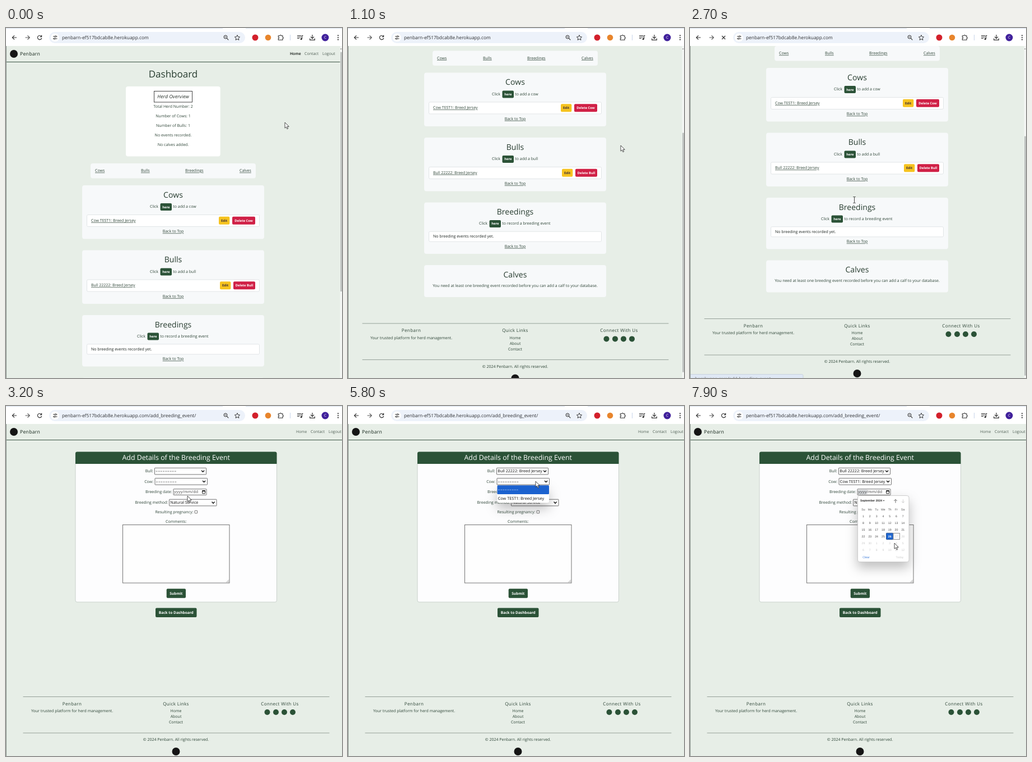
Animation, 600 px wide and 623 px high, one loop 8000 ms. Source, as an HTML page:

```html
<!DOCTYPE html>
<html lang="en">
<head>
<meta charset="utf-8">
<title>Herd dashboard</title>
<style>
html,body{margin:0;width:100%;height:100%;overflow:hidden;background:#e7eee7}
svg{display:block;width:600px;height:623px}
text{font-family:"Open Sans","Noto Sans",sans-serif;text-rendering:geometricPrecision;white-space:pre}
.arial{font-family:"Liberation Sans",Arial,sans-serif}
.u{text-decoration:underline;text-decoration-thickness:.6px}
.pop{filter:drop-shadow(0 10px 10px rgba(0,0,0,.25))}
</style>
</head>
<body>
<svg id="stage" viewBox="0 0 600 623" xmlns="http://www.w3.org/2000/svg"></svg>
<script>
const BRAND = 'Penbarn', HOST = 'penbarn-ef517bdcab8e.herokuapp.com';
const INK = '#2f4638', DARK = '#2b5237', LOOP = 8000;

// y is the visual middle of the line
const text = (x, y, s, size = 7, o = {}) =>
  `<text x="${x}" y="${(y + size * .35).toFixed(2)}" font-size="${size}" fill="${o.fill || INK}"` +
  ` text-anchor="${o.at || 'start'}" font-weight="${o.bold ? 700 : o.weight || 400}"` +
  ` letter-spacing="${o.ls || 0}" class="${o.cls || ''}"${o.italic ? ' font-style="italic"' : ''}${o.id ? ` id="${o.id}"` : ''}>${s}</text>`;
const mid = (x, y, s, size, o) => text(x, y, s, size, { ...o, at: 'middle' });
const link = (x, y, s, o) => text(x, y, s, 7, { ...o, cls: 'u' });
const rect = (x, y, w, h, fill, r = 0, more = '') =>
  `<rect x="${x}" y="${y}" width="${w}" height="${h}" rx="${r}" fill="${fill}" ${more}/>`;
const box = (x, y, w, h, stroke, r = 0, fill = '#fff') =>
  rect(x, y, w, h, fill, r, `stroke="${stroke}" stroke-width=".9"`);
const disc = (x, y, r, fill) => `<circle cx="${x}" cy="${y}" r="${r}" fill="${fill}"/>`;
const line = (d, stroke = '#333', w = 1.2, more = '') =>
  `<path d="${d}" fill="none" stroke="${stroke}" stroke-width="${w}" ${more}/>`;
const group = (id, s, more = '') => `<g id="${id}" ${more}>${s}</g>`;
const button = (x, y, w, h, s, fill, size = 5.8, color = '#fff') =>
  rect(x, y, w, h, fill, 2) + mid(x + w / 2, y + h / 2, s, size, { fill: color, bold: 1 });
const DASHES = '–'.repeat(9);

function toolbar() {
  const dot = y => disc(593, y, 1.1, '#333');
  return rect(0, 0, 600, 32, '#fff') +
    rect(0, 0, 387, 1.2, '#dce4f0') + rect(428, 0, 172, 1.2, '#dce4f0') +
    line('M19,17H11.5M15,13.3L11.3,17 15,20.7') +
    line('M34.5,17H42M38.5,13.3L42.2,17 38.5,20.7', '#555') +
    group('reload', line('M63,14.6A3.7,3.7 0 1 0 63.7,18') + line('M63.6,12.8V15.6H60.6')) +
    group('stop', line('M57,14L63,20M63,14L57,20')) +
    rect(77, 7, 350, 20, '#edf2fa', 10) + disc(87.5, 17, 7.3, '#fff') +
    line('M84,15H87M90,15H91.5M83.8,19H85.2M88.2,19H91.5', '#333', 1) +
    `<g fill="none" stroke="#333">${['88.6" cy="15', '86.7" cy="19'].map(c => `<circle cx="${c}" r="1.3"/>`).join('')}</g>` +
    text(100, 17, '', 8.35, { id: 'url', fill: '#2c2e31' }) +
    `<circle cx="392" cy="16" r="3" fill="none" stroke="#333"/>` + line('M394.2,18.2L397.3,21.3M390.6,16H393.4') +
    line('M413,12.6L414.4,15.6 417.6,16 415.2,18.2 415.9,21.4 413,19.7 410.1,21.4 410.8,18.2 408.4,16 411.6,15.6Z', '#333', 1) +
    disc(445, 17, 5.5, '#d3202b') + disc(468, 17, 5.3, '#e8852c') +
    line('M486.3,13.8H489A1.2,1.2 0 0 1 491.6,13.8H494V16.2A1.3,1.3 0 0 1 494,18.8V21.3H486.3V18.8A1.3,1.3 0 0 0 486.3,16.2Z', '#333', 1.1) +
    line('M507.5,12V22', '#c9d5ea', 1) +
    line('M520,13.5H527M520,16H527M520,18.5H524M528.5,19.5V13.5H530.5') + disc(527.2, 19.6, 1.6, '#333') +
    line('M547,12V18.5M544,15.7L547,18.7 550,15.7M542.7,18.5V21.3H551.3V18.5') +
    disc(570, 17, 6.5, '#40209b') + mid(570, 17, 'C', 6.5, { fill: '#fff' }) +
    dot(13.3) + dot(17) + dot(20.7);
}

const navbar = (dx, active) =>
  disc(14, 46, 7, '#151515') + text(25, 46, BRAND, 8.6, { fill: '#14251a', ls: .3 }) +
  text(507 + dx, 46, 'Home', 6.8, { fill: active ? '#0c120e' : '#526157', weight: active ? 600 : 400 }) +
  text(533 + dx, 46, 'Contact', 7, { fill: '#526157' }) + text(565 + dx, 46, 'Logout', 7, { fill: '#526157' }) +
  line('M0,60.5H600', '#3c5546', 1);

// laid out around the centre of the page
function footer(c, y) {
  const head = (x, s) => mid(x, y + 12.5, s, 8, { ls: .38 });
  const rule = k => line(`M${c - 273},${y + k}H${c + 274}`, '#8d9890', .9);
  return rule(0) + rule(64.5) +
    head(c - 185.5, BRAND) + head(c, 'Quick Links') + head(c + 185.5, 'Connect With Us') +
    mid(c - 185.5, y + 25.5, 'Your trusted platform for herd management.') +
    ['Home', 'About', 'Contact'].map((s, i) => mid(c, y + 25.5 + i * 10, s)).join('') +
    [163, 178.5, 193.5, 208.5].map(x => disc(c + x, y + 27.5, 5, DARK)).join('') +
    mid(c, y + 76.5, `© 2024 ${BRAND}. All rights reserved.`) + disc(c, y + 97.5, 7, '#151515');
}

const C = 298.5;
const panel = (y, h, title) => rect(136, y, 325, h, '#f7f9fa', 4) + mid(C, y + 16.8, title, 14, { fill: '#273c2f', ls: .05 });
const clickRow = (y, x, tail) =>
  text(x, y, 'Click') + button(x + 18.5, y - 6, 20.5, 13, 'here', DARK) + text(x + 41.3, y, tail);
const back = y => link(C, y, 'Back to Top', { at: 'middle' });

function stockPanel(y, title, kind, label, x, w) {
  return panel(y, 95.5, title) + clickRow(y + 38, 257, `to add a ${kind.toLowerCase()}`) +
    box(144.5, y + 52.5, 308, 21, '#dfe3e5', 2) + link(152, y + 62.5, label) +
    button(x, y + 55.8, 19.3, 14, 'Edit', '#f6c31f', 5.8, '#3a2c3a') +
    button(445 - w, y + 55.8, w, 14, `Delete ${kind}`, '#d02046') + back(y + 82);
}

function dashboard() {
  const facts = ['Total Herd Number: 2', 'Number of Cows: 1', 'Number of Bulls: 1', 'No events recorded.', 'No calves added.'];
  return navbar(0, true) +
    mid(C, 82.5, 'Dashboard', 17, { fill: '#273c2f' }) +
    rect(214, 104, 168.7, 124.5, '#fff', 4) + box(264.5, 112.5, 68, 19.5, '#333') +
    mid(C, 122, 'Herd Overview', 8.6, { italic: 1, ls: .15, fill: '#222b25' }) +
    facts.map((s, i) => mid(C, 140 + i * 16.9, s)).join('') +
    rect(151, 241, 295, 26.5, '#f7f9fa', 4) +
    link(159, 254, 'Cows') + link(241, 254, 'Bulls') + link(320, 254, 'Breedings') + link(417, 254, 'Calves') +
    stockPanel(280, 'Cows', 'Cow', 'Cow TEST1: Breed Jersey', 380, 41) +
    stockPanel(395.5, 'Bulls', 'Bull', 'Bull 22222: Breed Jersey', 382, 39) +
    panel(511, 91.5, 'Breedings') + clickRow(548.5, 234, 'to record a breeding event') +
    box(144.5, 562.8, 308, 18, '#dfe3e5', 2) + text(152, 571.2, 'No breeding events recorded yet.', 7, { fill: '#1d2420' }) + back(589) +
    panel(622.5, 57, 'Calves') + mid(C, 659, 'You need at least one breeding event recorded before you can add a calf to your database.') +
    footer(C, 726.5);
}

const select = (x, y, w, s, id) =>
  box(x, y, w, 11.6, '#666', .6) + text(x + 1.8, y + 5.7, s, 7.1, { fill: '#111', id }) +
  line(`M${x + w - 8.4},${y + 4.4}l2.5,2.6 2.5,-2.6`, '#111', 1.4);

const menu = (id, x, y, w, s) => group(id,
  `<g class="pop">${rect(x, y, w, 31, '#fff', 3)}</g>` +
  rect(x, y, w, 15.6, '#1c62cf', 1.5, `id="${id}Mark"`) +
  text(x + 1.3, y + 7.6, DASHES, 7, { ls: .6, id: id + 'A' }) +
  text(x + 1.3, y + 23.3, s, 7.25, { id: id + 'B' }));

function calendar() {
  const small = (x, y, s, fill, bold) => mid(x, y, s, 5.2, { fill, bold, cls: 'arial' });
  let out = `<g class="pop">${box(299.5, 159.5, 91.5, 118, '#c8c8c8', 3.5)}</g>` +
    text(304, 168.7, 'September 2024', 5.1, { fill: '#222', bold: 1, cls: 'arial' }) +
    '<path d="M344.5,167.8h3l-1.5,1.8Z" fill="#333"/>' +
    line('M367,172.5V166.5M364.3,169L367,166.3 369.7,169', '#555', .9) +
    line('M380.5,166.3V172.3M377.8,169.7L380.5,172.4 383.2,169.7', '#ccc', .9) +
    rect(350.5, 226.2, 12.2, 11.4, '#1e66d0', .8, 'stroke="#17407d" stroke-width=".8"') +
    box(363, 226.4, 11.5, 11, '#888');
  const x = i => 309.5 + i % 7 * 11.8;
  'Su Mo Tu We Th Fr Sa'.split(' ').forEach((d, i) => out += small(x(i), 184, d, '#555'));
  for (let i = 0; i < 42; i++) {
    const fill = i === 25 ? '#fff' : i > 25 ? '#c9c9c9' : '#444';
    out += small(x(i), 196.3 + Math.floor(i / 7) * 11.9, i % 30 + 1, fill, i === 25);
  }
  return out + small(314.5, 268.7, 'Clear', '#3a79d8') + small(374.5, 268.7, 'Today', '#cfcfcf');
}

function form() {
  const label = (x, y, s) => text(x, y, s, 7, { at: 'end' });
  return navbar(11, false) +
    rect(124, 82, 359.5, 267, '#fdfdfe', 3, 'stroke="#c6cfc8" stroke-width=".9"') +
    `<path d="M124,103V84.5Q124,81.5 127,81.5H480.5Q483.5,81.5 483.5,84.5V103Z" fill="${DARK}"/>` +
    mid(303.7, 91.2, 'Add Details of the Breeding Event', 12.35, { fill: '#fff' }) +
    label(263, 116, 'Bull:') + select(265.5, 110.3, 92, '', 'bull') +
    label(263, 134.3, 'Cow:') + select(266, 128.6, 93.5, '', 'cow') +
    label(296.5, 153, 'Breeding date:') + box(299, 147.8, 59, 10.6, '#666', .6) +
    rect(300, 149.3, 16.5, 7.8, '#d9dcdf', 0, 'id="focus"') +
    text(300.3, 152.8, 'yyyy/mm/dd', 7, { ls: .22, fill: '#444' }) +
    box(350.6, 150.8, 5, 5, '#111', .4) + rect(350.3, 150.3, 5.6, 1.8, '#111') +
    label(289.2, 171.8, 'Breeding method:') + select(291.5, 166.2, 84.5, 'Natural Service', 'method') +
    label(334.3, 188.6, 'Resulting pregnancy:') + box(337, 186.2, 4.7, 4.7, '#666', .6) +
    mid(303.8, 206, 'Comments:') + box(208.5, 211.5, 190.5, 103.5, '#666', 0, '#fefefe') +
    line('M393.5,314L398,309.5M396,314L398,312', '#777', .7) +
    button(286.7, 325.3, 34.3, 16.5, 'Submit', DARK, 6.5) +
    button(267, 359.5, 73.5, 16.5, 'Back to Dashboard', DARK, 6.6) +
    footer(303.5, 517.5) +
    menu('bullMenu', 266, 122.7, 91.3, 'Bull 22222: Breed Jersey') +
    menu('cowMenu', 266.5, 141.3, 92.5, 'Cow TEST1: Breed Jersey') + group('calendar', calendar());
}

const stage = document.getElementById('stage');
stage.innerHTML = rect(0, 0, 600, 623, '#e7eee7') +
  group('dash', group('page', dashboard()) +
    rect(596.5, 32, 3.5, 591, '#f4f6f4') + '<path d="M596.8,38h2.8l-1.4,-2Z" fill="#888"/>' +
    rect(597, 43, 3, 426, '#bfc3c1', 0, 'id="thumb"') +
    group('status', rect(-5, 616.5, 207, 12, '#dfe8f5', 2, 'stroke="#c3cddb" stroke-width=".8"') +
      text(9, 623.8, 'herokuapp.com/add_breeding_event', 7.9, { fill: '#555' }))) +
  group('form', form()) +
  line('M.5,32V623', '#8b958e', 1) + toolbar() +
  group('cursor',
    group('arrow', '<path d="M0,0V10.2L2.4,8.1 4,11.8 5.7,11 4.1,7.4H7.3Z" fill="#fff" stroke="#222" stroke-width=".8"/>') +
    group('beam', line('M-2.2,-5.5H-.6Q0,-5.5 0,-4.8Q0,-5.5 .6,-5.5H2.2M0,-4.8V4.8M-2.2,5.5H-.6Q0,5.5 0,4.8Q0,5.5 .6,5.5H2.2', '#333', .9)));

const el = {};
stage.querySelectorAll('[id]').forEach(n => el[n.id] = n);

const SCROLL = [[950, 0], [1000, 75], [1100, 200.5], [1200, 209]];
const PATH = [
  [900, 498, 168], [1100, 487, 209], [1900, 487, 209], [2400, 266, 339], [2600, 266, 339], [2700, 293.5, 306],
  [2900, 324, 160], [3700, 324, 160], [4000, 333, 113], [4800, 333, 113], [5000, 328, 138], [5100, 328, 138],
  [5300, 322, 146], [5500, 322, 146], [5700, 335, 134], [5950, 335, 134], [6300, 332, 165], [6400, 322, 164],
  [6650, 322, 164], [7000, 352, 152], [7600, 352, 154], [7900, 365, 244]];

// value of column k at time t, eased between neighbouring keys
function at(keys, t, k) {
  const i = keys.findIndex(p => p[0] > t);
  if (i === 0) return keys[0][k];
  if (i < 0) return keys[keys.length - 1][k];
  const [a, b] = [keys[i - 1], keys[i]], u = (t - a[0]) / (b[0] - a[0]);
  return a[k] + (b[k] - a[k]) * (keys === PATH ? u * u * (3 - 2 * u) : u);
}

const show = (id, on) => el[id].setAttribute('display', on ? 'inline' : 'none');
const move = (id, x, y) => el[id].setAttribute('transform', `translate(${x.toFixed(2)} ${y.toFixed(2)})`);
const fill = (id, c) => el[id].setAttribute('fill', c);

function setMenu(id, open, second) {
  show(id, open);
  move(id + 'Mark', 0, second ? 15.4 : 0);
  fill(id + 'A', second ? '#111' : '#fff');
  fill(id + 'B', second ? '#fff' : '#111');
}

function setValue(id, s) {
  el[id].textContent = s;
  el[id].setAttribute('letter-spacing', s === DASHES ? .6 : 0);
}

function draw(t) {
  const onForm = t >= 2800, scroll = at(SCROLL, t, 1);
  show('dash', !onForm);
  show('form', onForm);
  move('page', 0, -scroll);
  move('thumb', 0, scroll * .716);
  show('status', t >= 2300);
  const loading = t >= 2500 && !onForm;
  show('stop', loading);
  show('reload', !loading);
  el.url.textContent = HOST + (onForm ? '/add_breeding_event/' : '');
  setValue('bull', t >= 5500 ? 'Bull 22222: Breed Jersey' : DASHES);
  setValue('cow', t >= 6700 ? 'Cow TEST1: Breed Jersey' : DASHES);
  setMenu('bullMenu', t >= 4500 && t < 5500, t >= 5200);
  setMenu('cowMenu', t >= 5700 && t < 6700, t >= 6200);
  show('calendar', t >= 7400);
  show('focus', t >= 7400);
  const beam = t >= 2660 && t < 2800;
  show('beam', beam);
  show('arrow', !beam);
  move('cursor', at(PATH, t, 1), at(PATH, t, 2));
}

function tick() {
  draw(performance.now() % LOOP);
  requestAnimationFrame(tick);
}
tick();
</script>
</body>
</html>
```
